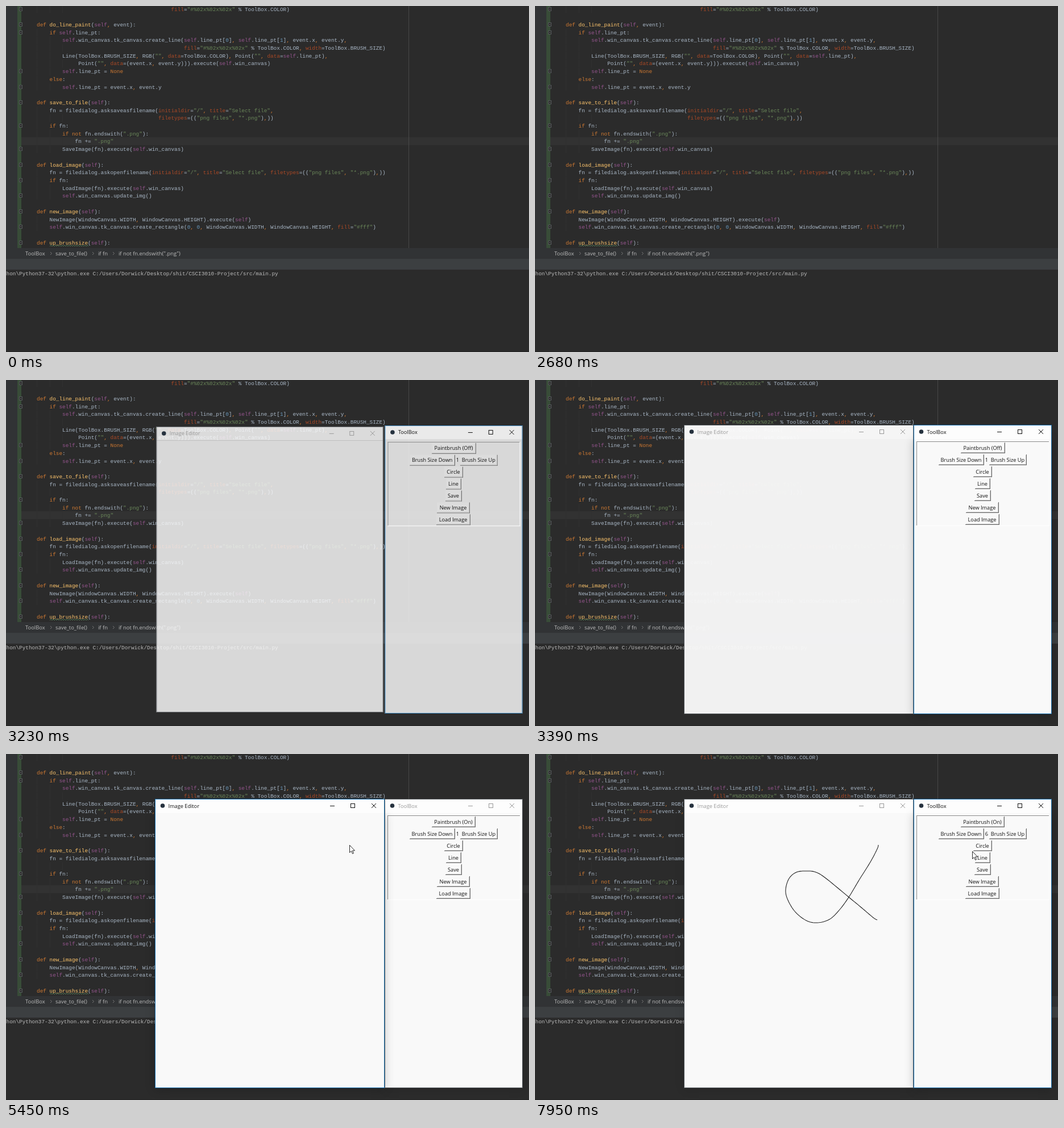
These frames come from a looping animation (920 px wide and 609 px high, 8 s). An HTML page with a canvas:

```html
<!DOCTYPE html>
<html lang="en">
<head>
<meta charset="utf-8">
<title>Drawing tool demo</title>
<style>
  html, body { margin: 0; width: 100%; height: 100%; overflow: hidden; background: #2b2b2b; }
  canvas { display: block; }
</style>
</head>
<body>
<canvas id="stage" width="920" height="609"></canvas>
<script>
const ctx = document.getElementById('stage').getContext('2d');
const LOOP = 8000, ACTION_START = 3080, STEP = 138.8;
const MONO = '9.385px "Liberation Mono", monospace';
const UI = '9.2px "Open Sans", "Noto Sans", sans-serif';
const CRUMB = '9.4px "Open Sans", "Noto Sans", sans-serif';
const CHAR = 5.63, ROW = 13.7, CODE_X = 31.5, CODE_Y = 5.6;

const CODE = String.raw`
                                              fill="#%02x%02x%02x" % ToolBox.COLOR)

    def do_line_paint(self, event):
        if self.line_pt:
            self.win_canvas.tk_canvas.create_line(self.line_pt[0], self.line_pt[1], event.x, event.y,
                                                  fill="#%02x%02x%02x" % ToolBox.COLOR, width=ToolBox.BRUSH_SIZE)
            Line(ToolBox.BRUSH_SIZE, RGB("", data=ToolBox.COLOR), Point("", data=self.line_pt),
                 Point("", data=(event.x, event.y))).execute(self.win_canvas)
            self.line_pt = None
        else:
            self.line_pt = event.x, event.y

    def save_to_file(self):
        fn = filedialog.asksaveasfilename(initialdir="/", title="Select file",
                                          filetypes=(("png files", "*.png"),))
        if fn:
            if not fn.endswith(".png"):
                fn += ".png"
            SaveImage(fn).execute(self.win_canvas)

    def load_image(self):
        fn = filedialog.askopenfilename(initialdir="/", title="Select file", filetypes=(("png files", "*.png"),))
        if fn:
            LoadImage(fn).execute(self.win_canvas)
            self.win_canvas.update_img()

    def new_image(self):
        NewImage(WindowCanvas.WIDTH, WindowCanvas.HEIGHT).execute(self)
        self.win_canvas.tk_canvas.create_rectangle(0, 0, WindowCanvas.WIDTH, WindowCanvas.HEIGHT, fill="#fff")

    def up_brushsize(self):`.slice(1).split('\n');

// Capture groups: string, function name, keyword or comma, self, argument, number
const TOKEN = /("[^"]*")|((?<=def )\w+)|(\b(?:def|if|not|else|None)\b|,)|(\bself\b)|(\w+(?==))|(\b\d\b)|\w+|./g;
const TOKEN_COLORS = ['#6a8759', '#ffc66d', '#cc7832', '#94558d', '#aa4926', '#6897bb'];
const FOLD_ROWS = [0, 2, 3, 8, 10, 12, 15, 18, 20, 22, 24, 26, 28, 30];

const CURVE = smooth([[604,160],[602,167],[590,190],[570,222],[552,252],[535,275],[518,291],[497,297],
  [477,293],[457,277],[444,255],[441,238],[447,219],[460,208],[478,206],[494,208],[512,219],
  [552,252],[575,271],[595,288],[602,292]]);
const DRAW_FROM = 17, DRAW_TO = 23;

// Pointer stops: step, x, y
const POINTER = [[5,724,350],[7,737,306],[10,769,114],[14,769,114],[15,748,121],[17,604,160],
  [23,602,292],[24,640,275],[25,741,191],[26,768,168],[28,838,139],[32,838,139],
  [33,803,169],[34,775,174],[35,769,171]];

const clamp = (v, lo, hi) => Math.max(lo, Math.min(hi, v));

function rect(x, y, w, h, color) {
  ctx.fillStyle = color;
  ctx.fillRect(x, y, w, h);
}

function text(str, x, y, color, font, align = 'left') {
  ctx.font = font;
  ctx.fillStyle = color;
  ctx.textAlign = align;
  ctx.fillText(str, x, y);
}

function line(points, color, width = 1) {
  ctx.beginPath();
  points.forEach(p => ctx.lineTo(...p));
  ctx.strokeStyle = color;
  ctx.lineWidth = width;
  ctx.stroke();
}

// Catmull-Rom spline through the given points
function smooth(points, parts = 10) {
  const out = [];
  for (let i = 0; i < points.length - 1; i++) {
    const a = points[Math.max(i - 1, 0)], b = points[i], c = points[i + 1];
    const d = points[Math.min(i + 2, points.length - 1)];
    for (let j = 0; j < parts; j++) {
      const u = j / parts;
      out.push([0, 1].map(n => b[n] + u / 2 * (c[n] - a[n]
        + u * (2 * a[n] - 5 * b[n] + 4 * c[n] - d[n] + u * (3 * (b[n] - c[n]) + d[n] - a[n])))));
    }
  }
  return [...out, points[points.length - 1]];
}

function drawCode() {
  CODE.forEach((row, i) => {
    const y = CODE_Y + i * ROW;
    const indent = row.search(/\S/);
    for (let col = 4; col < Math.min(indent, 13); col += 4)
      rect(Math.round(CODE_X + col * CHAR), y - ROW / 2, 1, ROW, '#303030');
    for (const m of row.matchAll(TOKEN)) {
      const kind = m.slice(1).findIndex(Boolean);
      if (m[0] !== ' ')
        text(m[0], CODE_X + m.index * CHAR, Math.round(y + 3), TOKEN_COLORS[kind] || '#a9b7c6', MONO);
    }
  });
  const wave = Array.from({ length: 35 }, (_, i) => [77 + i * 2, i % 2 ? 421 : 423]);
  line(wave, '#5b8a5f', 0.8);
}

function drawFold(y) {
  rect(24, y - 3, 5, 6, '#2b2b2b');
  ctx.strokeStyle = '#55595b';
  ctx.lineWidth = 1;
  ctx.strokeRect(23.5, y - 3.5, 5, 6);
  rect(25, y - 1, 2, 1, '#6c6f70');
}

function drawEditor(caretOn) {
  rect(0, 0, 920, 609, '#2b2b2b');
  rect(0, 0, 20, 426, '#313335');
  rect(20, 0, 7, 426, '#384c38');
  rect(27, 231, 893, 14, '#323232');
  rect(708, 0, 1, 426, '#484848');
  FOLD_ROWS.forEach(row => drawFold(Math.round(CODE_Y + row * ROW)));
  drawCode();
  if (caretOn) rect(188, 231, 2, 14, '#bbbbbb');

  rect(0, 426, 920, 19, '#313335');
  rect(0, 445, 920, 19, '#3c3f41');
  [['ToolBox', 34], ['save_to_file()', 87], ['if fn', 162], ['if not fn.endswith(".png")', 198]]
    .forEach(([label, x]) => text(label, x, 439, '#bbbbbb', CRUMB));
  for (const x of [78, 152, 188]) line([[x, 433], [x + 2.5, 435.5], [x, 438]], '#777');
  text('hon\\Python37-32\\python.exe C:/Users/Dorwick/Desktop/shit/CSCI3010-Project/src/main.py',
    0.5, 474, '#bbbbbb', MONO);
  rect(0, 608, 920, 1, '#242424');
}

function drawWindow({ x, w, title, active, alpha, titleAlpha = alpha, scale, content }) {
  const y = 79, h = 509, right = x + w, cx = x + w / 2, cy = y + h / 2;
  ctx.save();
  ctx.translate(cx, cy);
  ctx.scale(scale, scale);
  ctx.translate(-cx, -cy);

  ctx.globalAlpha = alpha;
  if (alpha === 1) {
    ctx.shadowColor = active ? 'rgba(0,0,0,.22)' : 'rgba(0,0,0,.12)';
    ctx.shadowBlur = 16;
    ctx.shadowOffsetY = 2;
  }
  rect(x, y + 25, w, h - 25, '#f9f9f9');
  ctx.shadowColor = 'transparent';
  ctx.globalAlpha = titleAlpha;
  rect(x, y, w, 25, '#fdfdfd');

  const ink = active ? '#111' : '#999';
  ctx.globalAlpha = alpha;
  ctx.strokeStyle = active ? '#1c74b4' : '#5a5f63';
  ctx.lineWidth = 1;
  ctx.strokeRect(x + 0.5, y + 0.5, w - 1, h - 1);

  ctx.globalAlpha = Math.min(1, alpha * 2);
  ctx.beginPath();
  ctx.arc(x + 13.5, y + 12, 3.8, 0, 7);
  ctx.fillStyle = '#26323f';
  ctx.fill();
  text(title, x + 23.5, y + 15.5, ink, UI);
  line([[right - 96, y + 12.5], [right - 88, y + 12.5]], ink);
  ctx.strokeRect(right - 59.5, y + 8.5, 7, 7);
  line([[right - 23, y + 8], [right - 15, y + 16]], ink);
  line([[right - 15, y + 8], [right - 23, y + 16]], ink);
  content();
  ctx.restore();
}

function button(label, left, right, y, face) {
  rect(left, y - 9, right - left, 19, face);
  rect(left, y + 9, right - left, 1, '#696969');
  rect(right - 1, y - 9, 1, 19, '#696969');
  rect(left + 1, y + 8, right - left - 2, 1, '#c4c4c4');
  rect(right - 2, y - 8, 1, 17, '#c4c4c4');
  text(label, (left + right) / 2 - 0.5, y + 3.5, '#111', UI, 'center');
}

function drawTools(k) {
  rect(671, 108, 233, 1, '#8c8c8c');
  rect(671, 108, 1, 148, '#8c8c8c');
  if (k < 1) return;
  rect(671, 256, 234, 1, '#fff');
  rect(904, 108, 1, 149, '#fff');
  const on = k >= 13;
  const face = k === 1 ? '#dcdcdc' : '#f9f9f9';
  button(on ? 'Paintbrush (On)' : 'Paintbrush (Off)', 749, on ? 826 : 827, 119, face);
  button('Brush Size Down', 710, 790, 140, face);
  text(1 + clamp(k - 27, 0, 5), 794.5, 143.5, '#111', UI, 'center');
  button('Brush Size Up', 799, 865, 140, face);
  button('Circle', 771, 804, 161, face);
  button('Line', 774, 801, 182, face);
  button('Save', 773, 802, 203, face);
  button('New Image', 758, 816, 224, face);
  button('Load Image', 757, 817, 245, face);
}

function curveUpTo(k) {
  const part = clamp((k - DRAW_FROM) / (DRAW_TO - DRAW_FROM), 0, 1);
  return CURVE.slice(0, Math.round(part * (CURVE.length - 1)) + 1);
}

function drawSketch(k) {
  if (k >= DRAW_FROM) line(curveUpTo(k), '#1a1a1a', 1.05);
}

function pointerAt(k) {
  if (k > DRAW_FROM && k < DRAW_TO) return curveUpTo(k).pop();
  const next = POINTER.findIndex(p => p[0] >= k);
  if (next < 0) return POINTER[POINTER.length - 1].slice(1);
  const b = POINTER[next], a = POINTER[Math.max(next - 1, 0)];
  const u = a === b ? 0 : (k - a[0]) / (b[0] - a[0]);
  return [1, 2].map(n => a[n] + (b[n] - a[n]) * u);
}

function drawPointer([x, y]) {
  ctx.beginPath();
  [[0, 0], [0, 13], [3, 10.3], [5, 15], [7, 14.2], [5, 9.5], [9, 9.5]]
    .forEach(([dx, dy]) => ctx.lineTo(x + 0.5 + dx, y + 0.5 + dy));
  ctx.closePath();
  ctx.fillStyle = '#fff';
  ctx.fill();
  ctx.strokeStyle = '#111';
  ctx.lineWidth = 0.9;
  ctx.stroke();
}

function render(t) {
  const caretOn = (t >= 840 && t < 1660) || (t >= 2090 && t < 2680);
  drawEditor(caretOn);
  if (t < ACTION_START) return;

  const k = Math.floor((t - ACTION_START) / STEP);
  const painting = k >= DRAW_FROM && k < 28;
  const sketch = {
    x: 262, w: 404, title: 'Image Editor', active: painting,
    alpha: [0, 0.84, 0.96][k] ?? 1, scale: k === 1 ? 0.988 : 1,
    content: () => drawSketch(k)
  };
  const tools = {
    x: 666, w: 243, title: 'ToolBox', active: !painting,
    alpha: [0.42, 0.84][k] ?? 1, titleAlpha: [0.42, 0.91][k] ?? 1, scale: [0.968, 0.996][k] ?? 1,
    content: () => drawTools(k)
  };
  // The focused window lies on top
  const stack = painting ? [tools, sketch] : [sketch, tools];
  stack.filter(win => win.alpha > 0).forEach(drawWindow);
  if (k >= POINTER[0][0]) drawPointer(pointerAt(k));
}

const start = performance.now();
function tick() {
  render((performance.now() - start) % LOOP);
  requestAnimationFrame(tick);
}
tick();
</script>
</body>
</html>
```
